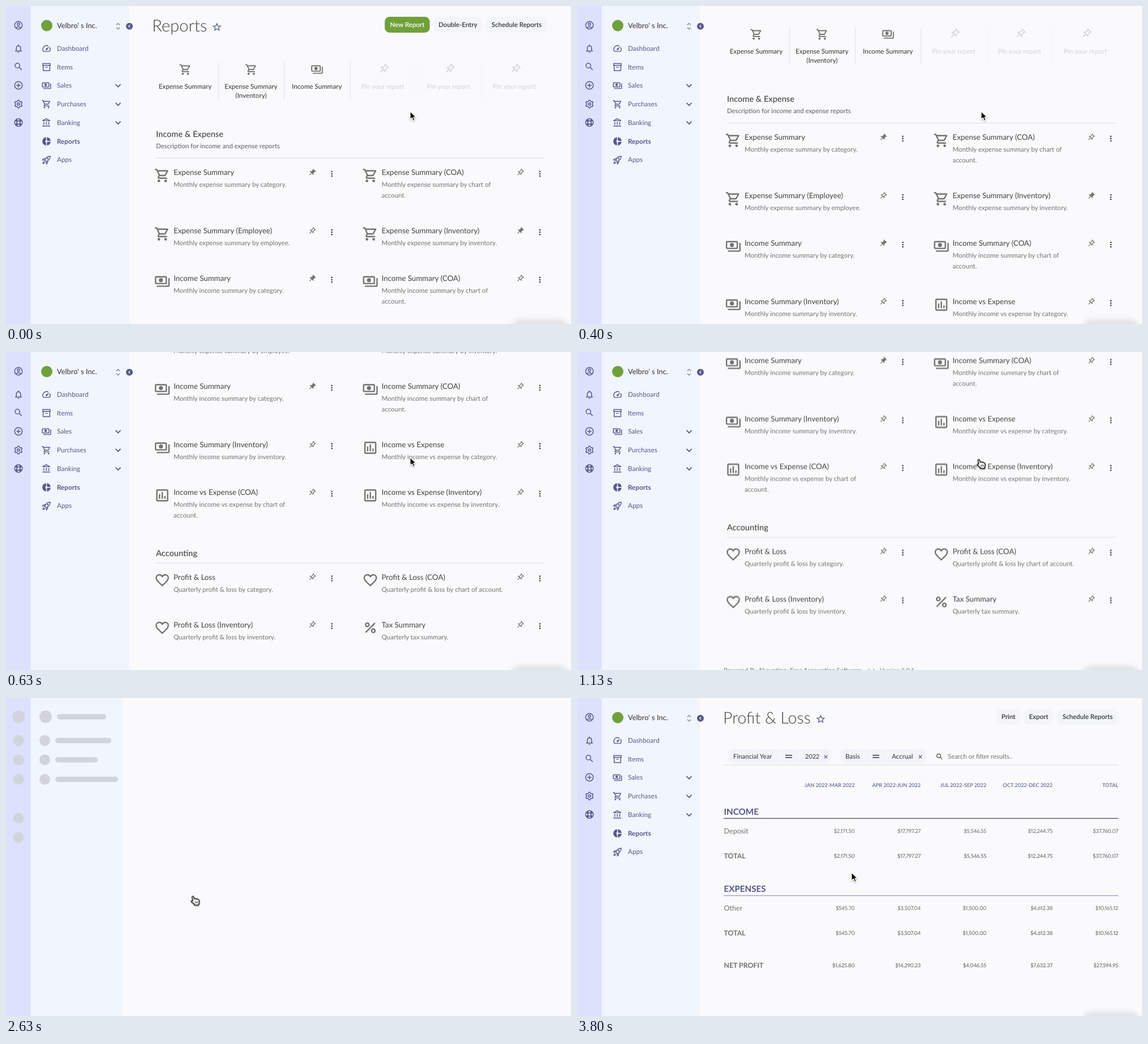
Write an HTML page that moves like this. It is 998 px wide and 561 px high and loops after 4.66 s.

```html
<!DOCTYPE html>
<html lang="en">
<head>
<meta charset="utf-8">
<title>Reports</title>
<style>
html, body { margin: 0; width: 100%; height: 100%; overflow: hidden; background: #fafafc; }
svg { display: block; width: 998px; height: 561px; }
text { font-family: Lato, Inter, sans-serif; text-rendering: geometricPrecision; }
.num { letter-spacing: -.15px; font-variant-numeric: proportional-nums; }
.icon { fill: currentColor; }
.line { fill: none; stroke: currentColor; stroke-width: 2; }
.play { animation: 4660ms step-end infinite; }
#scroll { animation-name: scroll; }
#list { animation-name: list; }
#side { animation-name: side; }
#report { animation-name: report; }
#toggle, #widget { animation-name: edge; }
#skeleton { animation-name: skeleton; }
#cursor { animation-name: move; }
#arrow { animation-name: arrow; }
#hand { animation-name: hand; }
.under { animation-timing-function: ease-out; }
#under1 { animation-name: under1; transform-origin: 664px 0; }
#under2 { animation-name: under2; transform-origin: 296px 0; }

@keyframes scroll {
  0% { transform: translateY(0); }
  4.29% { transform: translateY(-5px); }
  4.93% { transform: translateY(-12px); }
  5.57% { transform: translateY(-21px); }
  6.43% { transform: translateY(-31px); }
  7.08% { transform: translateY(-40.5px); }
  7.72% { transform: translateY(-50px); }
  8.58% { transform: translateY(-62px); }
  9.22% { transform: translateY(-75px); }
  9.87% { transform: translateY(-90px); }
  10.72% { transform: translateY(-111px); }
  11.37% { transform: translateY(-135px); }
  12.01% { transform: translateY(-205px); }
  12.87% { transform: translateY(-320px); }
  13.51% { transform: translateY(-420px); }
  14.16%, 100% { transform: translateY(-465.5px); }
}
@keyframes list { 0% { opacity: 1; } 56.43%, 100% { opacity: 0; } }
@keyframes side { 0%, 67.16%, 100% { opacity: 1; } 56.43% { opacity: 0; } }
@keyframes edge { 0%, 67.81%, 100% { opacity: 1; } 56.43% { opacity: 0; } }
@keyframes report { 0% { opacity: 0; } 67.81% { opacity: .5; } 68.66%, 100% { opacity: 1; } }
@keyframes skeleton {
  0% { opacity: 0; }
  56.43% { opacity: 1; animation-timing-function: cubic-bezier(.4, 0, .9, .7); }
  67.15% { opacity: .75; }
  67.16%, 100% { opacity: 0; }
}
@keyframes move {
  0% { transform: translate(714px, 186px); }
  24.24% { transform: translate(713px, 186.5px); animation-timing-function: cubic-bezier(.55, 0, .35, 1); }
  33.47% { transform: translate(333.5px, 346.5px); }
  75.75% { transform: translate(333.5px, 346.5px); animation-timing-function: cubic-bezier(.35, 0, .4, 1); }
  81.54%, 100% { transform: translate(485px, 308px); }
}
@keyframes arrow { 0%, 27.9%, 75.75%, 100% { opacity: 1; } 24.24%, 32.6% { opacity: 0; } }
@keyframes hand { 0%, 27.9%, 75.75%, 100% { opacity: 0; } 24.24%, 32.6% { opacity: 1; } }
@keyframes under1 { 0%, 24.7%, 30.7%, 100% { transform: scaleX(0); } 27.9% { transform: scaleX(1); } }
@keyframes under2 { 0%, 31.3% { transform: scaleX(0); } 34.33%, 100% { transform: scaleX(1); } }
</style>
</head>
<body>
<svg id="stage" viewBox="0 0 998 561"></svg>
<script>
const PURPLE = '#55588b', DARK = '#424242', GREY = '#727272', FAINT = '#d6d6da', GREEN = '#70a03c', SOFT = '#f3f5f7', RULE = '#e2e2e7';

const fill = d => `<path d="${d}"/>`;
const line = s => `<g class="line">${s}</g>`;
const ring = (x, y, r, more = '') => `<circle cx="${x}" cy="${y}" r="${r}" ${more}/>`;
const tilt = s => `<g transform="rotate(45 12 12)">${s}</g>`;
const PIN = 'M17 2H7c-.55 0-1 .45-1 1s.45 1 1 1h1v5c0 1.66-1.34 3-3 3v2h5.97v7l1 1 1-1v-7H19v-2c-1.66 0-3-1.34-3-3V4h1c.55 0 1-.45 1-1s-.45-1-1-1z';

// six teeth, two outer and two inner corners each
const gearRim = 'M' + Array.from({ length: 24 }, (_, i) => {
  const a = (i * 15 - 97.5) * Math.PI / 180, r = i % 4 < 2 ? 9.2 : 6.9;
  return (12 + r * Math.cos(a)).toFixed(2) + ' ' + (12 + r * Math.sin(a)).toFixed(2);
}).join('L') + 'z';

const ICONS = {
  cart: fill('M15.55 13c.75 0 1.41-.41 1.75-1.03l3.58-6.49c.37-.66-.11-1.48-.87-1.48H5.21l-.94-2H1v2h2l3.6 7.59-1.35 2.44C4.52 15.37 5.48 17 7 17h12v-2H7l1.1-2h7.45zM6.16 6h12.15l-2.76 5H8.53z') + ring(7, 20, 2) + ring(17, 20, 2),
  cash: line('<rect x="2" y="5" width="16" height="10" rx="1"/><path d="M22 7v11q0 1-1 1H4"/>') + ring(10, 10, 3),
  chart: line('<rect x="4" y="4" width="16" height="16" rx="1"/><path d="M8 10v7M12 7v10M16 13v4"/>'),
  heart: line('<path d="M12 20C6 14.6 3 11.9 3 8.5 3 5.9 5 4 7.5 4 9.3 4 11 5 12 6.6 13 5 14.7 4 16.5 4 19 4 21 5.9 21 8.5 21 11.9 18 14.6 12 20z"/>'),
  percent: line(ring(7.5, 7.5, 2.6) + ring(16.5, 16.5, 2.6) + '<path d="M5 19L19 5"/>'),
  pinned: tilt(fill(PIN)),
  pin: tilt(fill('M14 4v5c0 1.12.37 2.16 1 3H9c.65-.86 1-1.9 1-3V4h4' + PIN)),
  dash: fill('m20.38 8.57-1.23 1.85a8 8 0 0 1-.22 7.58H5.07A8 8 0 0 1 15.58 6.85l1.85-1.23A10 10 0 0 0 3.35 19a2 2 0 0 0 1.72 1h13.85a2 2 0 0 0 1.74-1 10 10 0 0 0-.27-10.44zm-9.79 6.84a2 2 0 0 0 2.83 0l5.66-8.49-8.49 5.66a2 2 0 0 0 0 2.83z'),
  box: line('<path d="M3 3.5h18V8H3zM4 8v12.5h16V8M9 12.5h6"/>'),
  bank: fill('M4.5 10h2v7h-2zM10.5 10h2v7h-2zM16.5 10h2v7h-2zM2 19h19v2H2zM11.5 3.26L16.71 6H6.29zm0-2.26L2 6v2h19V6z'),
  pie: fill('M11 9.16V2c-5 .5-9 4.79-9 10s4 9.5 9 10v-7.16c-1-.41-2-1.52-2-2.84s1-2.43 2-2.84zM14.86 11H22c-.48-4.75-4-8.53-9-9v7.16c1 .3 1.52.98 1.86 1.84zM13 14.84V22c5-.47 8.52-4.25 9-9h-7.14c-.34.86-.86 1.54-1.86 1.84z'),
  rocket: line('<path d="M8 13c2-6 6-10 13-10 0 7-4 11-10 13zM9 9l-4 .5L2.5 12 8 13M15 15l-.5 4-2.5 2.5L11 16M6.5 16c-2 .5-3 2.5-3 4.5 2 0 4-1 4.5-3"/>') + ring(15, 9, 1.8),
  user: line(ring(12, 12, 9) + ring(12, 9.5, 2.7) + '<path d="M5.8 18c3.5-3 8.9-3 12.4 0"/>'),
  bell: line('<path d="M4 18h16M7 18v-7c0-3 2-5.500 5-5.500s5 2.500 5 5.500v7M12 2.500V5"/>'.replace(/500/g, '5')) + fill('M10 20h4a2 2 0 0 1-4 0z'),
  search: line(ring(9.5, 9.5, 5.5) + '<path d="M13.5 13.5l6.2 6.2"/>'),
  plus: line(ring(12, 12, 9) + '<path d="M12 7v10M7 12h10"/>'),
  gear: line(`<path stroke-linejoin="round" d="${gearRim}"/>` + ring(12, 12, 2.7)),
  buoy: line(ring(12, 12, 9) + ring(12, 12, 4) + ring(12, 12, 6.5, 'stroke-width="3.6" pathLength="360" stroke-dasharray="48 42" stroke-dashoffset="-21"')),
  star: line('<path d="M12 3l2.7 6.1 6.6.6-5 4.4 1.5 6.5L12 17.2l-5.8 3.4 1.5-6.5-5-4.4 6.6-.6z"/>')
};

// x and y give the middle of an icon, and the middle height of a text line
const icon = (name, x, y, size, color) =>
  `<g class="icon" color="${color}" transform="translate(${x - size / 2} ${y - size / 2}) scale(${size / 24})">${ICONS[name]}</g>`;
const text = (x, y, str, size, color, weight = 400, anchor = 'start', cls = '') =>
  `<text x="${x}" y="${y + size * .34}" font-size="${size}" fill="${color}" font-weight="${weight}" text-anchor="${anchor}" class="${cls}">${str.replace(/&/g, '&amp;')}</text>`;
const rect = (x, y, w, h, color, r = 0, more = '') =>
  `<rect x="${x}" y="${y}" width="${w}" height="${h}" rx="${r}" fill="${color}" ${more}/>`;
const stroke = (d, color, w) => `<path d="${d}" fill="none" stroke="${color}" stroke-width="${w}"/>`;
const group = (id, body) => `<g id="${id}" class="play">${body}</g>`;
const button = (x, w, label, bg = SOFT, color = '#333338') =>
  rect(x, 19, w, 28, bg, 8.5) + text(x + w / 2, 33, label, 11.5, color, 600, 'middle');

function sidebar() {
  const rail = [['user', 34], ['bell', 75], ['search', 107], ['plus', 140], ['gear', 173], ['buoy', 205.5]];
  const nav = [['dash', 'Dashboard'], ['box', 'Items'], ['cash', 'Sales', 1], ['cart', 'Purchases', 1], ['bank', 'Banking', 1], ['pie', 'Reports'], ['rocket', 'Apps']];
  return rect(206, 0, 12, 561, '#f1f5fe') +
    rail.map(([n, y]) => icon(n, 22, y, 18, PURPLE)).join('') +
    ring(72, 34.5, 10, `fill="${GREEN}"`) +
    text(90, 34.5, 'Velbro\' s Inc.', 12.8, DARK, 500) +
    stroke('M195 33.5l3-3 3 3M195 38l3 3 3-3', '#77778a', 1.2) +
    nav.map(([n, label, open], i) => {
      const y = 75 + i * 32.75;
      return icon(n, 71.5, y, 17.5, PURPLE) +
        text(90, y, label, 11.7, PURPLE, label === 'Reports' ? 700 : 400) +
        (open ? stroke(`M193.5 ${y - 2.3}l4.5 4.5 4.5-4.5`, PURPLE, 1.7) : '');
    }).join('');
}

function pinBar() {
  const cells = [['cart', 'Expense Summary'], ['cart', 'Expense Summary', '(Inventory)'], ['cash', 'Income Summary'], ['pin'], ['pin'], ['pin']];
  return cells.map(([n, label, more], i) => {
    const x = 316.5 + i * 116.3, empty = n === 'pin';
    return icon(n, x + (empty ? 1.5 : .3), empty ? 111 : 112, empty ? 21 : 22.5, empty ? FAINT : GREY) +
      text(x, 142.5, label || 'Pin your report', 11.6, empty ? FAINT : DARK, 500, 'middle') +
      (more ? text(x, 158, more, 11.6, DARK, 500, 'middle') : '') +
      (i < 5 ? rect(x + 58.3, 99, 1, 66, i < 3 ? '#e0e0e5' : '#f4f4f7') : '');
  }).join('');
}

function card(col, y, name, title, lines, pinned) {
  const x = col * 367.5;
  return icon(name, x + 276, y + 5.5, 28.5, GREY) +
    text(x + 296, y, title, 13.3, DARK) +
    lines.split('|').map((s, i) => text(x + 296, y + 22 + i * 19, s, 11.5, GREY)).join('') +
    icon(pinned ? 'pinned' : 'pin', x + 540.5, y + .5, 15, GREY) +
    [-4, 0, 4].map(d => ring(x + 575.5, y + 2.5 + d, 1.3, 'fill="#333"')).join('');
}

function reportList() {
  const cards = [
    [293.5, 'cart', 'Expense Summary', 'Monthly expense summary by category.', 1],
    [293.5, 'cart', 'Expense Summary (COA)', 'Monthly expense summary by chart of|account.'],
    [396.5, 'cart', 'Expense Summary (Employee)', 'Monthly expense summary by employee.'],
    [396.5, 'cart', 'Expense Summary (Inventory)', 'Monthly expense summary by inventory.', 1],
    [480.5, 'cash', 'Income Summary', 'Monthly income summary by category.', 1],
    [480.5, 'cash', 'Income Summary (COA)', 'Monthly income summary by chart of|account.'],
    [583.5, 'cash', 'Income Summary (Inventory)', 'Monthly income summary by inventory.'],
    [583.5, 'chart', 'Income vs Expense', 'Monthly income vs expense by category.'],
    [667.5, 'chart', 'Income vs Expense (COA)', 'Monthly income vs expense by chart of|account.'],
    [667.5, 'chart', 'Income vs Expense (Inventory)', 'Monthly income vs expense by inventory.'],
    [817, 'heart', 'Profit & Loss', 'Quarterly profit & loss by category.'],
    [817, 'heart', 'Profit & Loss (COA)', 'Quarterly profit & loss by chart of account.'],
    [901, 'heart', 'Profit & Loss (Inventory)', 'Quarterly profit & loss by inventory.'],
    [901, 'percent', 'Tax Summary', 'Quarterly tax summary.']
  ];
  return text(258, 35.5, 'Reports', 29.2, DARK, 300) + icon('star', 372.5, 37, 16, PURPLE) +
    button(669, 79.5, 'New Report', GREEN, '#fff') + button(755.5, 85.5, 'Double-Entry') + button(848, 108, 'Schedule Reports') +
    pinBar() +
    text(265, 226.5, 'Income & Expense', 14.6, DARK, 500) +
    text(265, 247, 'Description for income and expense reports', 11.4, '#5c5c60') +
    rect(265, 267.8, 685.5, 1.3, RULE) +
    text(265, 775, 'Accounting', 14.6, DARK, 500) + rect(265, 791.8, 685.5, 1.3, RULE) +
    cards.map((c, i) => card(i % 2, ...c)).join('') +
    rect(664, 675, 177, 1.2, '#555', 0, 'id="under1" class="play under"') +
    rect(296, 824.5, 72, 1.2, '#555', 0, 'id="under2" class="play under"') +
    text(259, 1027, 'Powered By Akaunting: Free Accounting Software', 11.2, GREY) +
    stroke('M517 1024l-3.5 3.5 3.5 3.5M523 1024l3.5 3.5-3.5 3.5', GREY, 1) +
    text(535, 1027, 'Version 3.0.1', 10.6, GREY);
}

function profitReport() {
  const ends = [490.5, 607, 723, 840, 956];
  const row = (y, cells, size, color, weight, cls) => cells.split(' ').map((s, i) =>
    text(ends[i], y, s.replace(/_/g, ' '), size, color, weight, 'end', cls)).join('');
  const money = (y, label, cells, bold) =>
    text(259.5, y, label, bold ? 12.3 : 12.6, GREY, bold ? 700 : 400) + row(y, cells, 9.4, '#666', bold ? 500 : 400, 'num');
  const section = (y, label, w) => text(259.5, y, label, 15.2, PURPLE, 700) + rect(259, y + 11.2, 697, w, PURPLE, 0, `opacity="${w > 1 ? 1 : .75}"`);
  const cross = x => stroke(`M${x - 2.8} 101l5.6 5.6m0-5.6l-5.6 5.6`, PURPLE, 1.2);
  const equal = x => rect(x - 6, 100.2, 12, 1.6, '#444') + rect(x - 6, 104.2, 12, 1.6, '#444');
  const chip = (x, w, cuts) => rect(x, 90, w, 25.5, '#f2f4f9', 7) + cuts.map(c => rect(c, 90, 1, 25.5, '#fafafc')).join('');
  const income = '$2,171.50 $17,797.27 $5,546.55 $12,244.75 $37,760.07';
  const spent = '$545.70 $3,507.04 $1,500.00 $4,612.38 $10,165.12';
  return text(258, 35.5, 'Profit & Loss', 28.5, DARK, 300) + icon('star', 430.5, 37, 16, PURPLE) +
    button(741, 42, 'Print') + button(790, 51, 'Export') + button(848, 108, 'Schedule Reports') +
    chip(267, 182.5, [356.5, 392]) + chip(465, 152, [508.5, 547]) +
    text(276, 103.5, 'Financial Year', 11.4, DARK, 500) + equal(374) + text(403, 103.5, '2022', 10.8, DARK, 500, 'start', 'num') + cross(439.5) +
    text(474, 103.5, 'Basis', 11.4, DARK, 500) + equal(528) + text(556, 103.5, 'Accrual', 11.4, DARK, 500) + cross(606.5) +
    icon('search', 640.5, 103.5, 14.5, DARK) + text(655, 103, 'Search or filter results..', 11.4, GREY) +
    rect(259, 117.7, 697, 1, '#dcdce3') +
    row(153.5, 'JAN_2022-MAR_2022 APR_2022-JUN_2022 JUL_2022-SEP_2022 OCT_2022-DEC_2022 TOTAL', 9.2, PURPLE, 500, '') +
    section(200.5, 'INCOME', 1.4) + money(235, 'Deposit', income) + money(278.5, 'TOTAL', income, 1) +
    section(337, 'EXPENSES', 1) + money(371, 'Other', spent) + money(414.5, 'TOTAL', spent, 1) +
    money(471.5, 'NET PROFIT', '$1,625.80 $14,290.23 $4,046.55 $7,632.37 $27,594.95', 1);
}

function skeleton() {
  const dots = [[22, 33, 11], [70, 33, 11], ...[75, 109, 143.5, 212, 246].map(y => [22, y, 9.5]), ...[75, 109, 143.5].map(y => [68.5, y, 9.5])];
  const bars = [[90, 33, 87], [87, 75, 99], [87, 109, 75], [87, 143.5, 111]];
  return dots.map(d => ring(...d, 'fill="#d1d5db"')).join('') +
    bars.map(([x, y, w]) => rect(x, y - 4.75, w, 9.5, '#d1d5db', 4.75)).join('');
}

const pointer = group('arrow',
    '<path d="M0 0v14l3.3-3 2.2 5.2 2.5-1-2.2-5.1h4.4z" fill="#000" stroke="#fff" stroke-width="1.1" stroke-linejoin="round"/>') +
  group('hand', '<g transform="translate(-7 2)"><path d="M3.6 9.2L2.3 3.2C2 1 4.6.6 5.2 2.6L6.3 6C7 4.9 8.8 5 9.1 6.2 10 5.4 11.5 5.7 11.8 6.8 13 6.2 14.3 7 14.4 8.2L15.2 12l-1.5 4.7H6.7L6 15C4 13.5 2.5 12 .9 10.9.3 9.6 1.8 8.5 3.6 9.2z" fill="#fff" stroke="#111" stroke-width="1.5" stroke-linejoin="round"/>' +
    stroke('M7.7 10.2l.4 3.8M9.9 10l.3 3.8M12 9.8l.2 3.8', '#222', .9) + '</g>');

document.getElementById('stage').innerHTML =
  '<defs><filter id="blur" x="-30%" y="-60%" width="160%" height="220%"><feGaussianBlur stdDeviation="4"/></filter>' +
  '<filter id="shade" x="-50%" y="-50%" width="200%" height="200%"><feDropShadow dx="0" dy="1.3" stdDeviation="1" flood-opacity=".35"/></filter></defs>' +
  rect(0, 0, 998, 561, '#fafafc') +
  group('list', group('scroll', reportList())) +
  group('report', profitReport()) +
  rect(0, 0, 44, 561, '#dde1fe') + rect(43.5, 0, 162.5, 561, '#f1f5fe') +
  group('side', sidebar()) +
  group('toggle', ring(218, 35.7, 6, `fill="${PURPLE}"`) + stroke('M219.2 33.2l-2.5 2.5 2.5 2.5', '#fff', 1.2)) +
  group('skeleton', skeleton()) +
  group('widget', rect(894, 553, 98, 40, '#000', 14, 'opacity=".09" filter="url(#blur)"')) +
  group('cursor', `<g filter="url(#shade)">${pointer}</g>`);
</script>
</body>
</html>
```
